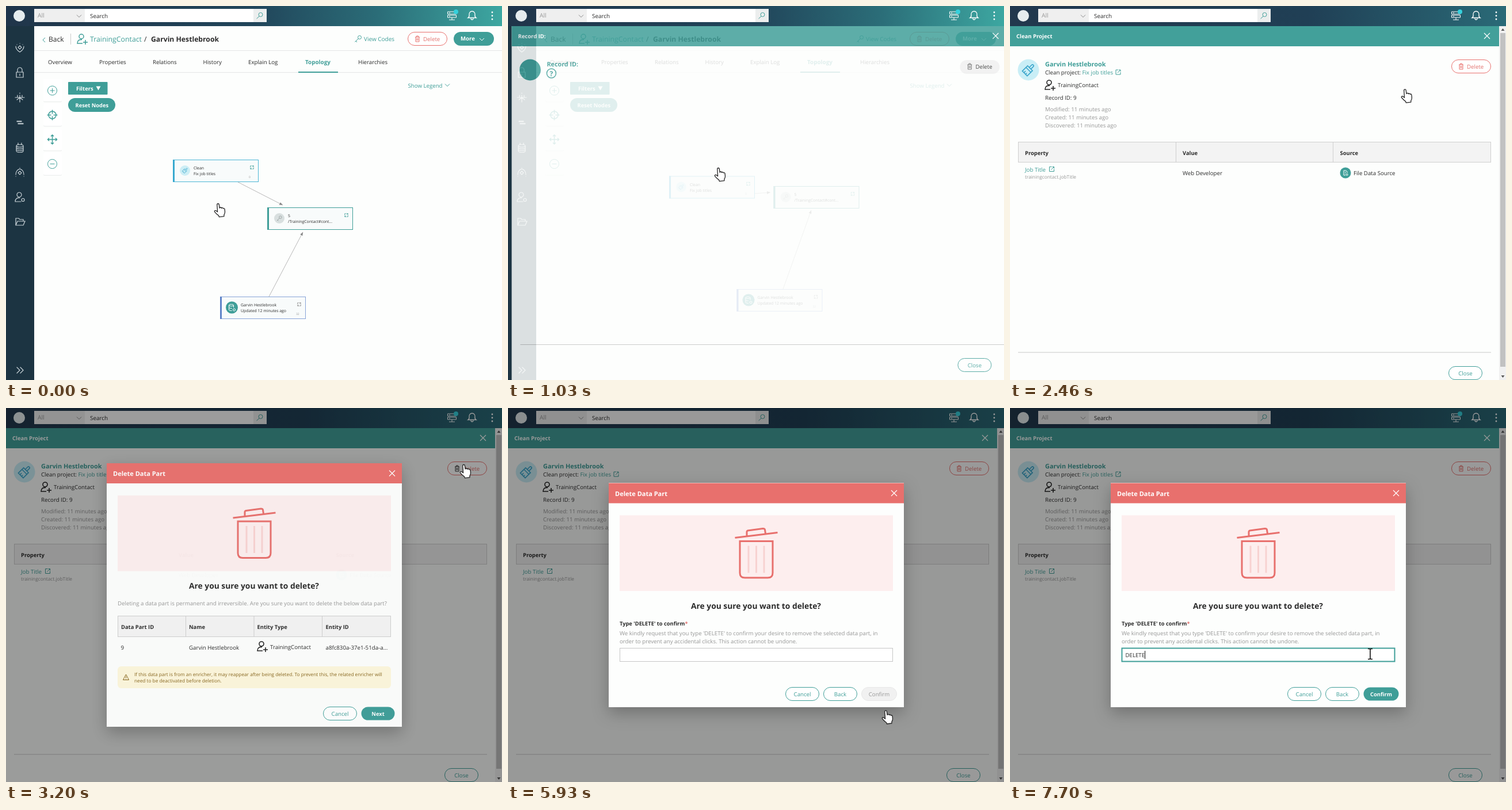
Recreate the animation shown at these times as an HTML page. Size 862x650 px, loop 8000 ms.

```html
<!DOCTYPE html>
<html lang="en">
<head>
<meta charset="utf-8">
<title>Delete a data part</title>
<style>
  html, body { margin: 0; width: 100%; height: 100%; overflow: hidden; background: #fff; }
  svg { display: block; }
  text { font: 9.7px "Open Sans", "Noto Sans", sans-serif; fill: #2b2b2b; text-rendering: geometricPrecision; }
  path { fill: none; }
  .bold { font-weight: 700; }
  .mid { text-anchor: middle; }
  .teal { fill: #3f9e98; }
  .white { fill: #fff; }
  .red { fill: #e2716d; }
  .grey { fill: #979797; }
  .amber { fill: #86651a; }
  #modal { filter: drop-shadow(0 10px 14px rgba(0, 0, 0, .26)); }
</style>
</head>
<body>
<svg id="stage" width="862" height="650" viewBox="0 0 862 650"></svg>
<script>
const NAME = 'Garvin Hestlebrook';
const TEAL = '#3f9e98', RED = '#e8706d', LOOP = 8000;

const ICONS = {
  person: 'M-4-4a4 4 0 1 1 8 0a4 4 0 1 1-8 0M2 8H-7C-7 3-4 1 1 1.5M7 2v8M3 6h8',
  trash: 'M-4-3H4M-1.5-3V-5H1.5V-3M-3-3V5H3V-3M-1-1V3M1-1V3',
  key: 'M-.5-2.5a3 3 0 1 1 6 0a3 3 0 1 1-6 0M.4-.4L-5.5 5.5M-4 4l2 2',
  down: 'M-4-2L0 2L4-2',
  back: 'M2-4L-2 0L2 4',
  close: 'M-5-5L5 5M5-5L-5 5',
  brush: 'M-2-4V-10a2 2 0 0 1 4 0V-4M-6-4H6V9H-6ZM-6 0H6M-2 9V5M2 9V6',
  open: 'M0-4H-4V4H4V0M1-4H4V-1M4-4L-1 1',
  link: 'M-1-3H-3V0M1 3H3V0M-3 3L-1 1M1-1L3-3M0-3H3V-1M-3 1V3H0',
  search: 'M-2-1a3.5 3.5 0 1 1 7 0a3.5 3.5 0 1 1-7 0M-1 2L-5.5 6',
  server: 'M-7.5-7H7.5V-3H-7.5ZM-7.5-1H7.5V3H-7.5ZM0 3V7M-5 7H5M-5-5h2M-5 1h2',
  bell: 'M-7 4C-4 2-5 0-5-2C-5-9 5-9 5-2C5 0 4 2 7 4ZM-2 5C-2 8 2 8 2 5',
  data: 'M-5-4C-5-6 3-6 3-4V0M-5-4C-5-2 3-2 3-4M-5-4V4C-5 5-3 5.5 0 5.5M-5 0C-5 1-2 1.5 0 1.5M2 4a2 2 0 1 1 4 0a2 2 0 1 1-4 0',
  file: 'M0 4H-3V-4H1L3-2V0M-1-1H1M-1 1H0M1 3a1.5 1.5 0 1 1 3 0a1.5 1.5 0 1 1-3 0',
  warning: 'M0-5L5 4.5H-5ZM0-1.5V1.5M0 2.5V3.3',
  plus: 'M-8 0a8 8 0 1 1 16 0a8 8 0 1 1-16 0M-4 0H4M0-4V4',
  minus: 'M-8 0a8 8 0 1 1 16 0a8 8 0 1 1-16 0M-4 0H4',
  target: 'M-6.5 0a6.5 6.5 0 1 1 13 0a6.5 6.5 0 1 1-13 0M-9 0H-2M2 0H9M0-9V-2M0 2V9',
  move: 'M-8 0H8M0-8V8M-2.5-5.5L0-8L2.5-5.5M-2.5 5.5L0 8L2.5 5.5M-5.5-2.5L-8 0L-5.5 2.5M5.5-2.5L8 0L5.5 2.5',
};

const SIDEBAR = [
  [72, 'M0-3l3 3-3 3-3-3ZM-7-2C-7 4-3 6 0 8C3 6 7 4 7-2M-5-5h.1M5-5h.1M0-7h.1'],
  [116, 'M-6-1H6V8H-6ZM-4-1V-5a4 4 0 0 1 8 0V-1M0 2v3'],
  [159, 'M-8 0H8M0-4V8M-4-4V0M4-4V0M-5 4L0 0L5 4M0-8v1'],
  [202, 'M-5-2H3M-3 2H6M-5-1.2H3M-3 2.8H6'],
  [246, 'M-6-3C-6-6 6-6 6-3V6C6 9-6 9-6 6ZM-6-3C-6 0 6 0 6-3M-6 0C-6 3 6 3 6 0M-6 3C-6 6 6 6 6 3M-3-5V-8M3-5V-8'],
  [289, 'M0-2l3 3-3 3-3-3ZM-7 4C-7-2-3-5 0-6C3-5 7-2 7 4M-7 7h.1M7 7h.1M0-8h.1'],
  [332, 'M-5-4a4 4 0 1 1 8 0a4 4 0 1 1-8 0M2 8H-8C-8 3-5 1 0 1.5M3 5a2.5 2.5 0 1 1 5 0a2.5 2.5 0 1 1-5 0'],
  [375, 'M-7 6V-6H-2L0-4H6V-1M-7 6L-4-1H9L6 6Z'],
  [633, 'M-5-5L0 0L-5 5M1-5L6 0L1 5'],
];

const text = (x, y, label, cls = '', size = 9.7) =>
  `<text x="${x}" y="${y}" class="${cls}" style="font-size:${size}px">${label}</text>`;
const rect = (x, y, w, h, fill, more = '') =>
  `<rect x="${x}" y="${y}" width="${w}" height="${h}" fill="${fill}" ${more}/>`;
const path = (d, stroke, more = '') => `<path d="${d}" stroke="${stroke}" ${more}/>`;
const circle = (x, y, r, fill, more = '') => `<circle cx="${x}" cy="${y}" r="${r}" fill="${fill}" ${more}/>`;
const icon = (name, x, y, color = TEAL, turn = '', more = '') =>
  path(ICONS[name] || name, color, `transform="translate(${x} ${y}) ${turn}" ${more}`);
const group = (id, body) => `<g id="${id}">${body}</g>`;
const pill = (x, y, w, label, cls = 'teal', fill = '#fff', stroke = TEAL, more = '') =>
  rect(x + .5, y + .5, w - 1, 23, fill, `rx="11.5" stroke="${stroke}" ${more}`) +
  text(x + w / 2, y + 15.5, label, 'mid ' + cls, cls.includes('bold') ? 9.4 : 9.7);
const deletePill = (x, y, id = '') =>
  rect(x + .5, y + .5, 68, 23, '#fff', `rx="11.5" stroke="${RED}"`) +
  icon('trash', x + 17, y + 12, RED, '', id) + text(x + 27, y + 15.5, 'Delete', 'red');
const gradient = (id, ...stops) => `<linearGradient id="${id}">` + stops.map(([at, color]) =>
  `<stop offset="${at}" stop-color="${color}"/>`).join('') + '</linearGradient>';

const node = (id, edge, bar, badge, title, detail, linkColor, count) => group(id,
  rect(.5, .5, 148, 38, '#f8fbfb', `stroke="${edge}"`) + rect(0, 0, 3, 39, bar) + badge +
  text(36, 17, title, '', 6.9) + text(36, 27, detail, '', 6.9) +
  icon('link', 137.5, 13.5, linkColor, 'scale(.9)') + text(132, 32, count, 'grey', 5));

const topBar =
  rect(0, 0, 862, 35, 'url(#bright)') + rect(0, 0, 862, 35, 'url(#dim)', 'id="dimBar"') +
  circle(23, 17, 10, '#e6ecee') +
  rect(49, 5, 88, 23, '#efefef') + rect(137, 5, 293, 23, '#fff') + rect(430, 5, 23, 23, '#eceeee') +
  text(55, 20, 'All', 'grey', 10.3) + text(146, 20.5, 'Search', '', 9.9) +
  icon('down', 127, 17.5, '#888') + icon('search', 441, 16) +
  icon('server', 775, 17, '#fff') + circle(782, 10, 4, '#35d0dc') + icon('bell', 810, 16.5, '#fff', '', 'stroke-width="1.3"') +
  [11, 17, 23].map(y => circle(845, y, 1.4, '#fff')).join('');

const tabs = [[73, 'Overview'], [162, 'Properties'], [255, 'Relations'], [342.5, 'History'],
  [421, 'Explain Log'], [612, 'Hierarchies']];

const page =
  rect(0, 35, 862, 615, '#fdfefd') + rect(0, 35, 49, 615, '#1c3442') +
  SIDEBAR.map(([y, d]) => icon(d, 24, y, '#ccd5da', '', 'stroke-width="1.2" stroke-linecap="round"')).join('') +
  path('M49 77.5H862M49 115.5H862', '#e4e6e6') +
  icon('back', 66, 59) + text(74, 62, 'Back', '', 12) + path('M112.5 48V67', '#ccc') +
  icon('person', 131, 57, TEAL, '', 'stroke-width="1.5"') + text(146, 62, 'TrainingContact', 'teal', 12.3) +
  text(240, 62, '/', '', 12.3) + text(252, 62, NAME, 'bold', 12.2) +
  icon('key', 612, 57) + text(622, 61, 'View Codes', 'teal', 10) +
  deletePill(698, 45) +
  rect(778, 45, 70, 24, TEAL, 'rx="12"') + text(790, 60, 'More', 'bold white', 9.6) + icon('down', 827, 58, '#fff') +
  tabs.map(([x, label]) => text(x, 101, label)).join('') +
  text(520, 101, 'Topology', 'bold teal', 9.9) + rect(508, 114, 69, 2, TEAL) +
  ['plus', 'target', 'move', 'minus'].map((name, i) =>
    rect(65, 128 + i * 42.6, 32, 39, '#e9eceb', 'rx="2"') + rect(65, 127 + i * 42.6, 32, 39, '#fff', 'rx="2"') +
    icon(name, 80.5, 147 + i * 42.5, TEAL, '', i % 3 ? 'stroke-width="1.5"' : '')).join('') +
  rect(108, 132, 68.5, 22, TEAL, 'rx="1"') + text(122, 146.5, 'Filters', 'bold white', 9.5) +
  '<path d="M156.500 139.500h8l-4 7z" style="fill:#fff"/>' +
  rect(108, 160, 82, 24, TEAL, 'rx="12"') + text(120.5, 176, 'Reset Nodes', 'bold white', 9.3) +
  text(698.5, 142, 'Show Legend', 'teal') + icon('down', 767, 137.5) +
  '<path id="edgeA" stroke="#999" stroke-width=".7" marker-end="url(#arrow)"/>' +
  '<path id="edgeB" stroke="#999" stroke-width=".7" marker-end="url(#arrow)"/>' +
  node('clean', '#4cb6d5', '#38a9cf', circle(21, 19, 9, '#cdeef5') + icon('brush', 21, 19, '#36a6cc', 'rotate(45) scale(.45)', 'stroke-width="1.6"'),
    'Clean', 'Fix job titles', TEAL, '0') +
  node('code', TEAL, TEAL, circle(21, 19, 9, '#d8dfdf') + icon('key', 21, 19, '#8c9696', 'scale(.75)'),
    '5', '/TrainingContact#cont...', TEAL, '') +
  node('record', '#87a4d8', '#5f83c8', circle(20.500, 19, 10.5, TEAL) + icon('data', 20.5, 19, '#fff'),
    NAME, 'Updated 12 minutes ago', '#888', '32');

const loading =
  rect(0, 35, 862, 615, '#fdfefd') + rect(0, 35, 862, 35, '#42a09a') +
  text(11, 56, 'Record ID:', 'bold white', 9.5) + icon('close', 841, 52, '#fff', '', 'stroke-width="1.2"') +
  circle(32, 111, 18.5, TEAL) + text(61, 105, 'Record ID:', 'bold teal', 10.8) +
  circle(69, 117, 8, 'none', `stroke="${TEAL}" stroke-width="1.5"`) + text(69, 121.5, '?', 'mid bold teal', 12) +
  rect(779, 94, 69, 24, '#f1f1f1', 'rx="12"') + icon('trash', 796, 105, '#666') + text(806, 109, 'Delete') +
  path('M15 588.5H856', '#c4c4c4') + pill(775, 612, 59, 'Close');

const loaded =
  rect(0, 35, 850, 615, '#fdfefd') + rect(0, 35, 850, 35, '#42a09a') +
  text(11, 56, 'Clean Project', 'bold white', 9.5) + icon('close', 829, 52, '#fff', '', 'stroke-width="1.2"') +
  circle(32, 111, 18.5, '#c9eef6') + icon('brush', 32, 111, '#3aa5cb', 'rotate(45)', 'stroke-width="1.6"') +
  text(61, 105, NAME, 'bold teal', 10.9) +
  text(61, 119, 'Clean project: <tspan class="teal">Fix job titles</tspan>') + icon('open', 188, 115) +
  icon('person', 68, 137, '#222', '', 'stroke-width="1.6"') + text(83, 141, 'TrainingContact') +
  text(61, 162.5, 'Record ID: 9') +
  ['Modified', 'Created', 'Discovered'].map((label, i) => text(61, 182.5 + i * 14, label + ': 11 minutes ago', 'grey')).join('') +
  deletePill(767, 93, 'id="deleteIcon"') +
  rect(14.5, 236.5, 821, 35, '#f3f3f3', 'stroke="#cfcfcf"') + path('M288.500 237V272M561.500 237V272', '#cfcfcf') +
  [[26, 'Property'], [300, 'Value'], [573.5, 'Source']].map(([x, label]) => text(x, 258.5, label, 'bold', 9.4)).join('') +
  text(26, 288, 'Job Title', 'teal') + icon('open', 72.5, 283.5) + text(26, 300, 'trainingcontact.jobTitle', 'grey', 8.3) +
  text(300, 293.5, 'Web Developer') + text(597, 293.5, 'File Data Source') +
  group('sourceIcon', circle(583, 290, 9.5, TEAL) + icon('file', 583, 290, '#fff')) +
  path('M14 602H836', '#c8c8c8') + pill(762, 626, 59, 'Close') +
  rect(850, 35, 12, 615, '#f1f1f1') + rect(852, 47, 9, 580, '#c1c1c1') +
  '<path d="M853.500 43l3-4 3 4zM853.500 642l3 4 3-4z" style="fill:#555"/>';

const modalTop =
  rect(175, 96, 513, 35, RED) + text(186, 118, 'Delete Data Part', 'bold white', 11) +
  icon('close', 671, 113.5, '#fff', '', 'stroke-width="1.2"') + rect(194, 152, 475, 131.5, '#fdeeee') +
  path('M394.500 191L468.500 182M415 188V181Q415 179 417 178.500L443 175Q446 175 446.500 177L447.500 184M403 197H460V252Q460 260.500 451.500 260.500H411.500Q403 260.500 403 252Z', RED, 'stroke-width="3"') +
  path('M418 205V252M431.500 205V252M445 205V252', '#f8d2d1', 'stroke-width="3"') +
  text(431, 314, 'Are you sure you want to delete?', 'bold mid', 13.8);

const columns = [[200, 'Data Part ID'], [318, 'Name'], [436.5, 'Entity Type'], [555.5, 'Entity ID']];

const stepOne =
  text(194, 343, 'Deleting a data part is permanent and irreversible. Are you sure you want to delete the below data part?', 'grey') +
  rect(194.5, 361.5, 474, 36, '#f3f3f3', 'stroke="#cfcfcf"') + path('M312.500 362V397M431 362V397M549.500 362V397', '#cfcfcf') +
  columns.map(([x, label]) => text(x, 384, label, 'bold', 9.4)).join('') +
  text(199.5, 420, '9') + text(318, 420, NAME) + icon('person', 444, 414, '#222', '', 'stroke-width="1.6"') +
  text(459, 419, 'TrainingContact') + text(555.5, 420, 'a8fc830a-37e1-51da-a...') +
  rect(194, 449, 475, 38, '#fdf6dc', 'rx="6"') + icon('warning', 208.5, 468, '#86651a') +
  text(223, 466, 'If this data part is from an enricher, it may reappear after being deleted. To prevent this, the related enricher will', 'amber', 8.27) +
  text(223, 476.5, 'need to be deactivated before deletion.', 'amber', 8.27) +
  pill(551, 519, 59, 'Cancel') + pill(617, 519, 59, 'Next', 'bold white', TEAL, 'none', 'id="next"');

const stepTwo =
  text(194, 377.5, 'Type \'DELETE\' to confirm<tspan class="red">*</tspan>', 'bold', 9.3) +
  text(194, 394.5, 'We kindly request that you type \'DELETE\' to confirm your desire to remove the selected data part, in', 'grey') +
  text(194, 408.5, 'order to prevent any accidental clicks. This action cannot be undone.', 'grey') +
  rect(194.5, 417.5, 474, 23, '#fff', 'id="field"') +
  '<text id="typed" x="200.500" y="433"></text>' + rect(0, 422, 1, 14, '#111', 'id="caret"') +
  pill(482, 485, 59, 'Cancel') + pill(548, 485, 59, 'Back') +
  group('confirmOff', pill(614, 485, 62, 'Confirm', 'grey', '#f1f1f1', '#e6e6e6', 'opacity=".95"')) +
  group('confirmOn', pill(614, 485, 62, 'Confirm', 'bold white', TEAL, 'none'));

const hand = 'M-4.200-9.600c-.2-2.400 3.200-2.600 3.500-.3l.8 6c.8-1.600 3-1.400 3.400.2c.9-1.200 2.700-.9 3 .7c1-.9 2.400-.2 2.500 1.200l.5 4.200c.2 2.600-.4 4-1.600 5.600v2.600l-8.600 1-.6-2.200c-2.600-1.600-4.800-4-7-6.600c-1.200-1.700.8-3.200 2.300-2l2.600 2z';

document.getElementById('stage').innerHTML = '<defs>' +
  gradient('bright', [0, '#20354a'], [.5, '#21455a'], [.75, '#2b6d78'], [1, '#3da7a1']) +
  gradient('dim', [0, '#22384d'], [.6, '#203f55'], [1, '#2a6a77']) +
  '<marker id="arrow" markerUnits="userSpaceOnUse" markerWidth="8" markerHeight="6" refX="6" refY="3" orient="auto"><path d="M0 .5L6 3L0 5.500z" style="fill:#888"/></marker></defs>' +
  group('page', page) + group('loading', loading) + group('loaded', loaded) + topBar +
  rect(0, 0, 862, 650, '#000', 'id="shade"') +
  group('modal', rect(175, 96, 513, 458, '#fdfefd', 'id="panel"') + group('modalTop', modalTop) +
    group('stepOne', stepOne) + group('stepTwo', stepTwo)) +
  group('cursor', path(hand, '#222', 'id="hand" stroke-width="1.3" stroke-linejoin="round" style="fill:#fff"') +
    path('M-4-9H-1L0-8L1-9H4M0-8V8M-4 9H-1L0 8L1 9H4', '#111', 'id="beam" stroke-width="1.6"'));

const ui = {};
document.querySelectorAll('[id]').forEach(el => ui[el.id] = el);

const progress = (t, start, length) => Math.min(1, Math.max(0, (t - start) / length));
const easeOut = p => 1 - (1 - p) ** 3;
const easeInOut = p => p < .5 ? 4 * p ** 3 : 1 - 4 * (1 - p) ** 3;
const mix = (from, to, p) => from.map((v, i) => v + (to[i] - v) * p);
const set = (id, name, value) => ui[id].setAttribute(name, value);
const show = (id, on) => set(id, 'display', on ? 'inline' : 'none');
const place = (id, x, y) => set(id, 'transform', `translate(${x} ${y})`);

// Start, duration and destination of each cursor move
const MOVES = [[100, 500, 368, 293], [1950, 850, 798, 110], [3710, 880, 659, 537.5], [5880, 880, 626, 427.5]];

function drawNodes(p) {
  place('clean', ...mix([290, 267], [280, 295.5], p));
  place('code', ...mix([454, 350], [461.5, 313], p));
  place('record', ...mix([372, 505], [397.5, 492], p));
  const line = ([a, b, c, d]) => `M${a} ${b}L${c} ${d}`;
  set('edgeA', 'd', line(mix([403, 306, 481, 346], [428, 326, 456, 324], p)));
  set('edgeB', 'd', line(mix([457, 505, 516, 393], [478, 492, 527, 355], p)));
}

function drawDrawer(t) {
  const p = easeOut(progress(t, 890, 300)), ready = t >= 1400;
  show('loading', p > 0 && !ready);
  set('loading', 'opacity', p);
  place('loading', 43 * (1 - p), 0);
  show('loaded', ready);
  show('dimBar', ready);
  set('sourceIcon', 'opacity', progress(t, 1700, 130));
  set('deleteIcon', 'stroke', t > 2680 && t < 3900 ? '#333' : RED);
}

function drawModal(t) {
  const p = easeOut(progress(t, 2980, 320)), second = t >= 4900;
  set('shade', 'opacity', .4 * p);
  show('modal', p > 0);
  set('modal', 'opacity', p);
  set('panel', 'y', second ? 130 : 96);
  set('panel', 'height', second ? 390 : 458);
  place('modalTop', 0, second ? 34.5 : 0);
  show('stepOne', !second);
  show('stepTwo', second);
  set('next', 'fill', t > 4730 ? '#2f7d78' : t > 4400 ? '#388f89' : TEAL);

  const focused = t >= 6930;
  set('field', 'stroke', focused ? TEAL : t > 6320 ? '#555' : '#c6c6c6');
  set('field', 'stroke-width', focused ? 2 : 1);
  const letters = t < 7330 ? 0 : 1 + Math.floor((t - 7330) / 62);
  ui.typed.textContent = 'DELETE'.slice(0, letters);
  show('caret', focused);
  set('caret', 'x', 200.5 + (letters ? ui.typed.getComputedTextLength() : 0));
  show('confirmOn', t >= 7660);
  show('confirmOff', t < 7660);
}

function drawCursor(t) {
  let at = [371, 355];
  for (const [start, length, ...to] of MOVES) at = mix(at, to, easeInOut(progress(t, start, length)));
  const overField = t > 5880 && at[1] < 451;
  place('cursor', ...at);
  show('hand', !overField);
  show('beam', overField);
}

function draw() {
  const t = performance.now() % LOOP;
  drawNodes(easeOut(progress(t, 880, 150)));
  drawDrawer(t);
  drawModal(t);
  drawCursor(t);
  requestAnimationFrame(draw);
}
draw();
</script>
</body>
</html>
```
